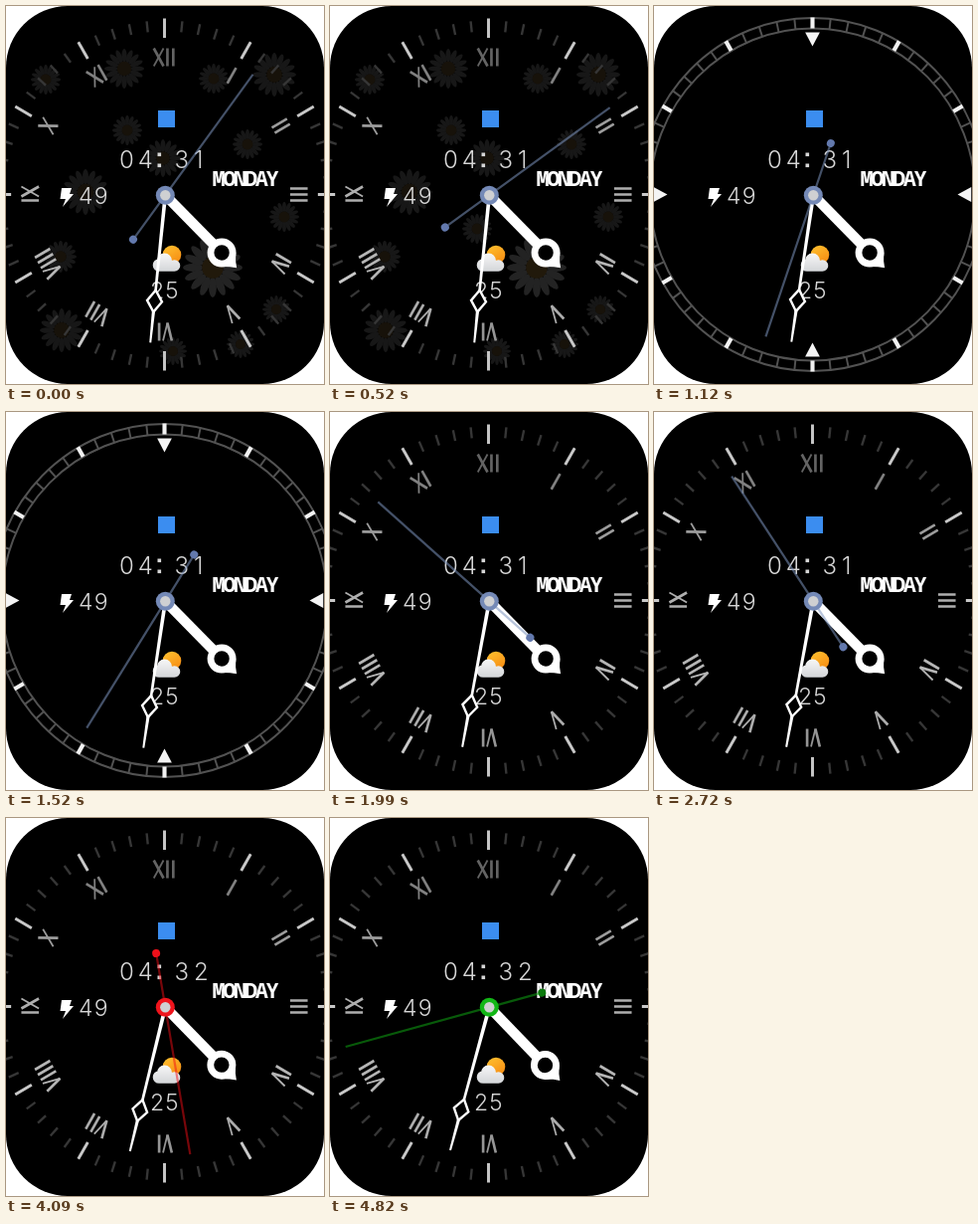
An HTML page with a canvas for the animation above (4950 ms loop, 320 by 380 pixels).

```html
<!DOCTYPE html>
<html lang="en">
<head>
<meta charset="utf-8">
<title>Watch face</title>
<style>
html, body { margin: 0; width: 100%; height: 100%; overflow: hidden; background: #fff; }
canvas { display: block; width: 320px; height: 380px; }
</style>
</head>
<body>
<canvas id="c" width="320" height="380"></canvas>
<script>
const ctx = document.getElementById('c').getContext('2d');
const LOOP = 4950, RAD = Math.PI / 180;
const CX = 160.3, CY = 190.2;

const BLUE = { line: 'rgba(125,148,190,.55)', dot: '#6379ad', ring: '#7489b6' };
const RED = { line: 'rgba(240,12,20,.5)', dot: '#f0101a', ring: '#f0141c' };
const GREEN = { line: 'rgba(16,180,20,.5)', dot: '#0a780c', ring: '#12b616' };

// Each scene: when the second hand jumps and the angle it jumps to.
const scenes = [
  { at: [0, 130, 260, 390, 520, 720, 920], sec: [36, 40.5, 45, 49.5, 54, 58.5, 63],
    min: 185.8, hour: 135.5, time: '31', face: 'roman', daisies: true, tint: BLUE },
  { at: [1120, 1320, 1520, 1790], sec: [198.6, 203.5, 211.8, 217.2],
    min: 188.5, hour: 135.5, time: '31', face: 'ring', tint: BLUE },
  { at: [1990, 2190, 2390, 2520, 2720], sec: [311.7, 316, 319.6, 322.6, 326.8],
    min: 190.5, hour: 135.5, time: '31', face: 'roman', tint: BLUE },
  { at: [2920, 3120, 3320, 3520], sec: [54.2, 58.5, 62.7, 66.9],
    min: 192.4, hour: 135.6, time: '32', face: 'roman', tint: RED },
  { at: [3720, 3920, 4090, 4290], sec: [161, 165.5, 170.4, 175],
    min: 193.8, hour: 135.7, time: '32', face: 'roman', tint: RED },
  { at: [4490, 4690, 4820], sec: [246.5, 250.5, 254.6],
    min: 195.3, hour: 136.1, time: '32', face: 'roman', tint: GREEN }
];

// x, y, radius
const daisies = [
  [119, 63, 20], [40, 74, 15], [209, 73, 15], [270, 69, 22], [122, 125, 15],
  [243, 139, 15], [158, 153, 19], [280, 212, 15], [55, 252, 16], [80, 187, 23],
  [56, 326, 22], [236, 340, 14], [168, 347, 14], [272, 305, 14], [208, 263, 30]
];

function disc(x, y, r, fill) {
  ctx.beginPath();
  ctx.arc(x, y, r, 0, 7);
  ctx.fillStyle = fill;
  ctx.fill();
}

function poly(points, fill, stroke, width) {
  ctx.beginPath();
  points.forEach(([x, y]) => ctx.lineTo(x, y));
  ctx.closePath();
  if (fill) { ctx.fillStyle = fill; ctx.fill(); }
  if (stroke) { ctx.strokeStyle = stroke; ctx.lineWidth = width; ctx.stroke(); }
}

function line(x1, y1, x2, y2, color, width) {
  ctx.beginPath();
  ctx.moveTo(x1, y1);
  ctx.lineTo(x2, y2);
  ctx.strokeStyle = color;
  ctx.lineWidth = width;
  ctx.stroke();
}

// Runs draw with the origin at x, y and up pointing along the angle.
function turned(x, y, deg, draw) {
  ctx.save();
  ctx.translate(x, y);
  ctx.rotate(deg * RAD);
  draw();
  ctx.restore();
}

// The dial is slightly narrower than it is high.
function onDial(deg, draw) {
  ctx.save();
  ctx.translate(159.5, 189.5);
  ctx.scale(0.98, 1);
  turned(0, 0, deg, draw);
  ctx.restore();
}

function daisy(x, y, r) {
  const n = 16, big = r > 25;
  for (let i = 0; i < n; i++) {
    turned(x, y, i * 360 / n, () => {
      ctx.beginPath();
      ctx.ellipse(0, -r * 0.66, r * 0.13, r * 0.34, 0, 0, 7);
      ctx.fillStyle = big ? '#232323' : '#171717';
      ctx.fill();
    });
  }
  disc(x, y, r * 0.36, big ? '#21190b' : '#17120a');
}

function numeral(word, color) {
  const wide = { I: 6, V: 11, X: 12 }, h = 9, thick = 2.7, thin = 1.8;
  let x = -[...word].reduce((sum, ch) => sum + wide[ch], 0) / 2;
  for (const ch of word) {
    const l = x + 1, r = x + wide[ch] - 1, m = (l + r) / 2;
    if (ch === 'I') line(m, -h, m, h, color, thick);
    if (ch === 'X') {
      line(l, -h, r, h, color, thick);
      line(r, -h, l, h, color, thin);
    }
    if (ch === 'V') {
      line(l, -h, m, h, color, thick);
      line(r, -h, m, h, color, thin);
    }
    x += wide[ch];
  }
}

function romanFace() {
  const words = 'XII I II III IV V VI VII VIII IX X XI'.split(' ');
  for (let i = 0; i < 60; i++) {
    onDial(i * 6, () => {
      if (i % 5) line(0, -175, 0, -164, '#363636', 2.4);
      else line(0, -177, 0, -157.5, '#c8c8c8', 3);
    });
  }
  words.forEach((word, i) => onDial(i * 30, () => {
    const a = i * 30 * RAD;
    const v = Math.round(125 + 50 * Math.abs(Math.sin(a)) - 25 * Math.cos(a));
    ctx.translate(0, -138);
    numeral(word, `rgb(${v},${v},${v})`);
  }));
}

function ringFace() {
  const dim = '#525252';
  for (const r of [177.5, 167]) {
    onDial(0, () => {
      ctx.beginPath();
      ctx.arc(0, 0, r, 0, 7);
      ctx.strokeStyle = dim;
      ctx.lineWidth = 2;
      ctx.stroke();
    });
  }
  for (let i = 0; i < 60; i++) {
    onDial(i * 6, () => {
      if (i % 5) line(0, -178, 0, -167, dim, 2);
      else line(0, -178, 0, -167, '#f2f2f2', 4.2);
      if (i % 15 === 0) poly([[-7.5, -163], [7.5, -163], [0, -149]], '#f4f4f4');
    });
  }
}

function text(str, x, y, font, color, spacing) {
  ctx.font = font;
  ctx.letterSpacing = spacing + 'px';
  ctx.fillStyle = color;
  ctx.fillText(str, x, y);
}

function weekday(str, x, y, pitch) {
  const font = '600 extra-condensed 22px "Noto Sans Mono", monospace';
  ctx.font = font;
  ctx.letterSpacing = '0px';
  text(str, x, y, font, '#fff', pitch - ctx.measureText('M').width);
}

function widgets(minutes) {
  const clock = '300 24px Inter, Lato, sans-serif';
  const small = '300 23px Inter, Lato, sans-serif';
  const pale = '#d6d6d6';
  ctx.fillStyle = '#3b8df0';
  ctx.fillRect(153, 105, 17, 17);

  text('04', 114, 163, clock, pale, 4);
  ctx.fillStyle = pale;
  ctx.fillRect(152.5, 147.5, 3.6, 3.6);
  ctx.fillRect(152.5, 158.5, 3.6, 3.6);
  text(minutes, 169.5, 163, clock, pale, 5);
  text('49', 73, 199, small, pale, 1.2);
  weekday('MONDAY', 207.5, 181, 10.8);

  poly([[56, 183], [66, 183], [64, 189], [68, 189], [57, 202], [60, 194], [54.5, 194]], '#fff');

  const sun = ctx.createLinearGradient(160, 241, 172, 260);
  sun.addColorStop(0, '#ffc02e');
  sun.addColorStop(1, '#f58a12');
  disc(167, 250, 9.3, sun);
  const cloud = ctx.createLinearGradient(0, 247, 0, 267);
  cloud.addColorStop(0, '#fafafa');
  cloud.addColorStop(1, '#d3d5d8');
  ctx.beginPath();
  ctx.arc(154, 260.5, 6.3, 0, 7);
  ctx.arc(159.5, 256, 7.5, 0, 7);
  ctx.arc(169.5, 261, 5.8, 0, 7);
  ctx.rect(154, 258, 15.5, 8.8);
  ctx.fillStyle = cloud;
  ctx.fill();

  text('25', 145, 294, small, pale, 1.2);
}

function hourHand(deg) {
  turned(CX, CY, deg, () => {
    line(0, -6, 0, -70, '#fff', 10.2);
    disc(0, -81, 14.5, '#fff');
    poly([[-10, -91], [-4, -97], [0, -102.5], [4, -97], [10, -91]], '#fff');
    disc(0, -81, 7.7, '#000');
  });
}

function minuteHand(deg) {
  turned(CX, CY, deg, () => {
    poly([[-1.9, 0], [1.9, 0], [1.3, -97], [-1.3, -97]], '#fff');
    poly([[-1.6, -117], [1.6, -117], [1, -149], [-1, -149]], '#fff');
    poly([[0, -96], [7.5, -107], [0, -118], [-7.5, -107]], '#000', '#fff', 2.4);
  });
}

function secondHand(deg, tint) {
  turned(CX, CY, deg, () => {
    line(0, 54, 0, -150, tint.line, 2.2);
    disc(0, 55, 4, tint.dot);
  });
  disc(CX, CY, 9.5, tint.ring);
  disc(CX, CY, 5.2, '#cfd0d2');
}

function draw(t) {
  const scene = scenes.findLast(s => s.at[0] <= t);
  const sec = scene.sec[scene.at.findLastIndex(start => start <= t)];

  ctx.fillStyle = '#fff';
  ctx.fillRect(0, 0, 320, 380);
  ctx.save();
  ctx.beginPath();
  ctx.roundRect(0, 0, 320, 380, 62);
  ctx.fillStyle = '#000';
  ctx.fill();
  ctx.clip();

  if (scene.daisies) {
    daisies.forEach(d => daisy(...d));
    if (t >= 260) daisy(148, 224, 15);
  }
  if (scene.face === 'ring') ringFace();
  else romanFace();
  widgets(scene.time);
  hourHand(scene.hour);
  minuteHand(scene.min);
  secondHand(sec, scene.tint);
  ctx.restore();
}

const begin = performance.now();
function tick() {
  draw((performance.now() - begin) % LOOP);
  requestAnimationFrame(tick);
}
tick();
</script>
</body>
</html>
```
